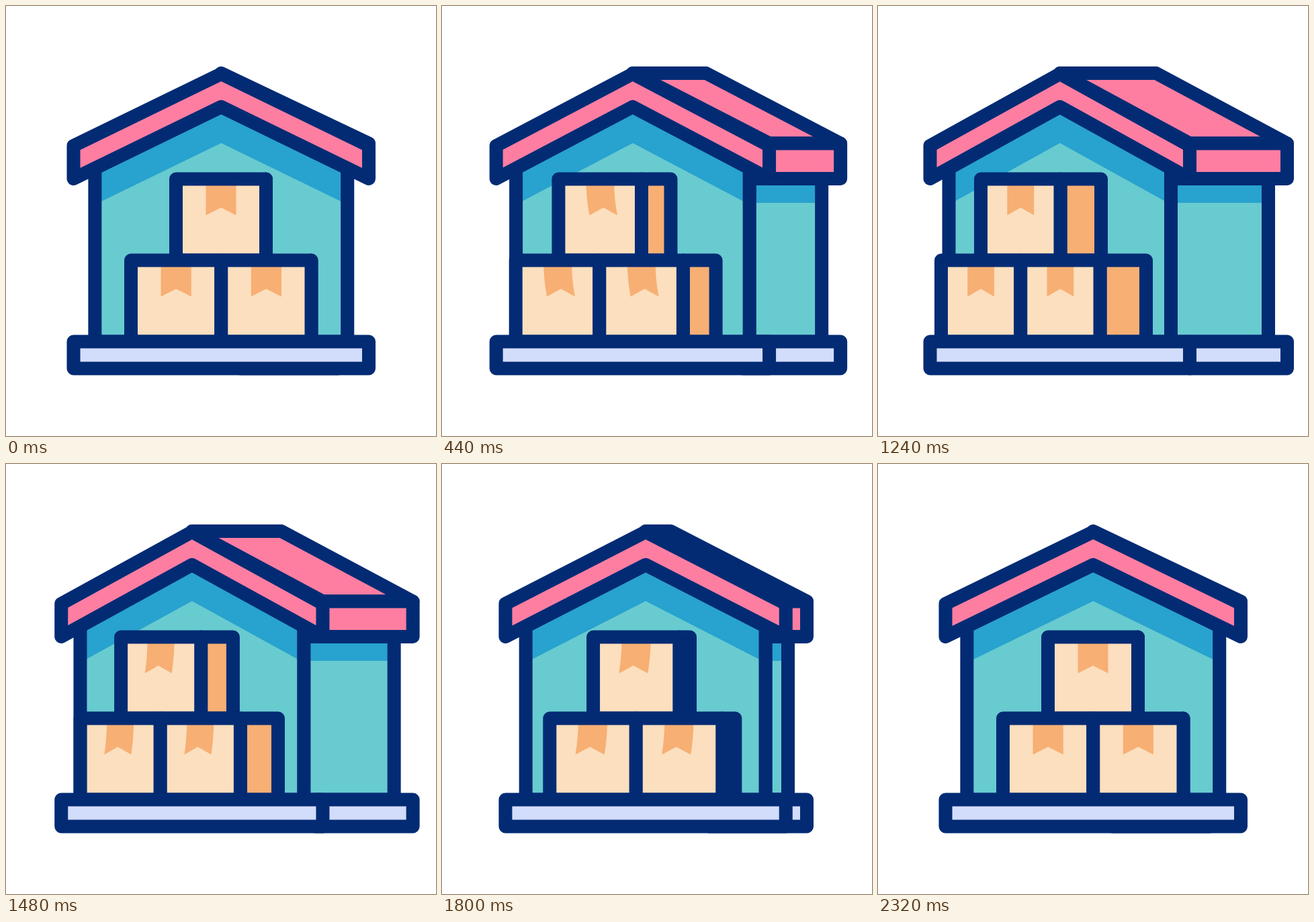
An HTML page with a canvas for the animation above (2.44 s loop, 640 px wide and 640 px high).

```html
<!DOCTYPE html>
<html lang="en">
<head>
<meta charset="utf-8">
<title>Warehouse</title>
<style>
  html, body { margin: 0; width: 100%; height: 100%; overflow: hidden; background: #fff; }
  canvas { display: block; width: 100vw; height: 100vh; }
</style>
</head>
<body>
<canvas id="stage" width="640" height="640"></canvas>
<script>
const ctx = document.getElementById('stage').getContext('2d');
const LOOP = 2440, STEP = 40, DEPTH = 145;
const NAVY = '#032b74', PINK = '#fe7ea2', BLUE = '#28a2ce', TEAL = '#68cbd0',
      PEACH = '#fcdfbe', ORANGE = '#f7af74', LILAC = '#d2dcfb';

// Turn away from the viewer and back: [start, length]
const OPEN = [0, 700], CLOSE = [1310, 800], SIDE_CLOSE = [1400, 731];

// x positions: front value, turned value, easing bias out, easing bias back
const TRACKS = {
  left:   [100.5, 77.5, 1, .36],
  right:  [540, 464, 0, -.15],
  side:   [494, 609, 1, 0, SIDE_CLOSE],
  topL:   [253, 153, .6, .27],
  topF:   [387, 271.5, .5, .2],
  topR:   [387, 332, .9, 0],
  lowL:   [186, 94, .8, .27],
  lowF:   [454.5, 330.5, .45, .15],
  lowR:   [454.5, 399, .9, 0]
};

// Ribbon tips trail behind the boxes: [ms, px]
const SWING = [[0, 0], [200, 5], [440, 5], [600, 0], [760, -3], [1000, 0], [1300, 0],
  [1500, -4], [1960, -4.5], [2120, 0], [2200, 2], [2320, 0], [LOOP, 0]];

const mix = (a, b, k) => a + (b - a) * k;
const sine = u => (1 - Math.cos(Math.PI * u)) / 2;

// bias 1 = quadratic out, 0 = sine in-out, -1 = quadratic in
function ease(t, [start, length], bias) {
  const u = Math.min(1, Math.max(0, (t - start) / length));
  const edge = bias > 0 ? 1 - (1 - u) ** 2 : u * u;
  return mix(sine(u), edge, Math.abs(bias));
}

function pose(t) {
  const p = {};
  for (const name in TRACKS) {
    const [rest, turned, out, back, close = CLOSE] = TRACKS[name];
    p[name] = mix(rest, turned, ease(t, OPEN, out) - ease(t, close, back));
  }
  const i = SWING.findIndex(k => k[0] > t);
  const [a, b] = [SWING[i - 1], SWING[i]];
  p.swing = mix(a[1], b[1], sine((t - a[0]) / (b[0] - a[0])));
  return p;
}

function poly(points, fill, outline = true) {
  ctx.beginPath();
  points.forEach(([x, y]) => ctx.lineTo(x, y));
  ctx.closePath();
  ctx.fillStyle = fill;
  ctx.fill();
  if (outline) ctx.stroke();
}

function rect(x1, y1, x2, y2, fill, outline) {
  poly([[x1, y1], [x2, y1], [x2, y2], [x1, y2]], fill, outline);
}

function ribbon(x1, x2, y, swing) {
  const c = (x1 + x2) / 2, h = (x2 - x1) * .168;
  ctx.beginPath();
  ctx.moveTo(c - h, y);
  ctx.quadraticCurveTo(c - h, y + 28, c - h + swing, y + 54);
  ctx.lineTo(c + swing, y + 42.5);
  ctx.lineTo(c + h + swing, y + 54);
  ctx.quadraticCurveTo(c + h, y + 28, c + h, y);
  ctx.closePath();
  ctx.fillStyle = ORANGE;
  ctx.fill();
}

function box(x1, x2, y, swing) {
  rect(x1, y, x2, y + 121, PEACH, false);
  ribbon(x1, x2, y, swing);
  ctx.beginPath();
  ctx.rect(x1, y, x2 - x1, 121);
  ctx.stroke();
}

function draw(t) {
  const p = pose(t);
  const { left, right, side, swing } = p;
  const apex = (left + right) / 2, half = (right - left) / 2;
  const inset = half * .145, postL = left + inset, postR = right - inset;
  const sidePost = side - 28;
  const ridge = Math.max(apex, side - (half + 197) / 2);
  const slopeY = y => y + 107 * (1 - inset / half);

  ctx.fillStyle = '#fff';
  ctx.fillRect(0, 0, 640, 640);
  ctx.strokeStyle = NAVY;
  ctx.lineWidth = 20;
  ctx.lineJoin = ctx.lineCap = 'round';

  // Side of the building
  rect(postR, 257, sidePost, 499.5, TEAL, false);
  rect(postR, 257, sidePost, 293, BLUE, false);
  rect(postR, 257, sidePost, 499.5, 'transparent');
  poly([[apex, 100], [ridge, 100], [side, 204.5], [right, 204.5]], PINK);
  rect(side - DEPTH, 204.5, side, 257, PINK);
  rect(side - DEPTH, 499.5, side, 539.5, LILAC);

  // Front wall with the shadow under the roof
  const wall = y => [[postL, slopeY(y)], [apex, y], [postR, slopeY(y)], [postR, 499.5], [postL, 499.5]];
  poly(wall(150), BLUE, false);
  poly(wall(204), TEAL, false);
  poly(wall(150), 'transparent');

  // Boxes
  const mid = (p.lowL + p.lowF) / 2;
  rect(p.topF, 257.5, p.topR, 378.5, ORANGE);
  box(p.topL, p.topF, 257.5, swing);
  rect(p.lowF, 378.5, p.lowR, 499.5, ORANGE);
  box(p.lowL, mid, 378.5, swing);
  box(mid, p.lowF, 378.5, swing);

  // Front roof and base
  poly([[left, 208], [apex, 101], [right, 208], [right, 257], [apex, 150], [left, 257]], PINK);
  rect(left, 499.5, right, 539.5, LILAC);
}

const begin = performance.now();
function tick() {
  const t = (performance.now() - begin) % LOOP;
  draw(Math.floor(t / STEP) * STEP);
  requestAnimationFrame(tick);
}
tick();
</script>
</body>
</html>
```
